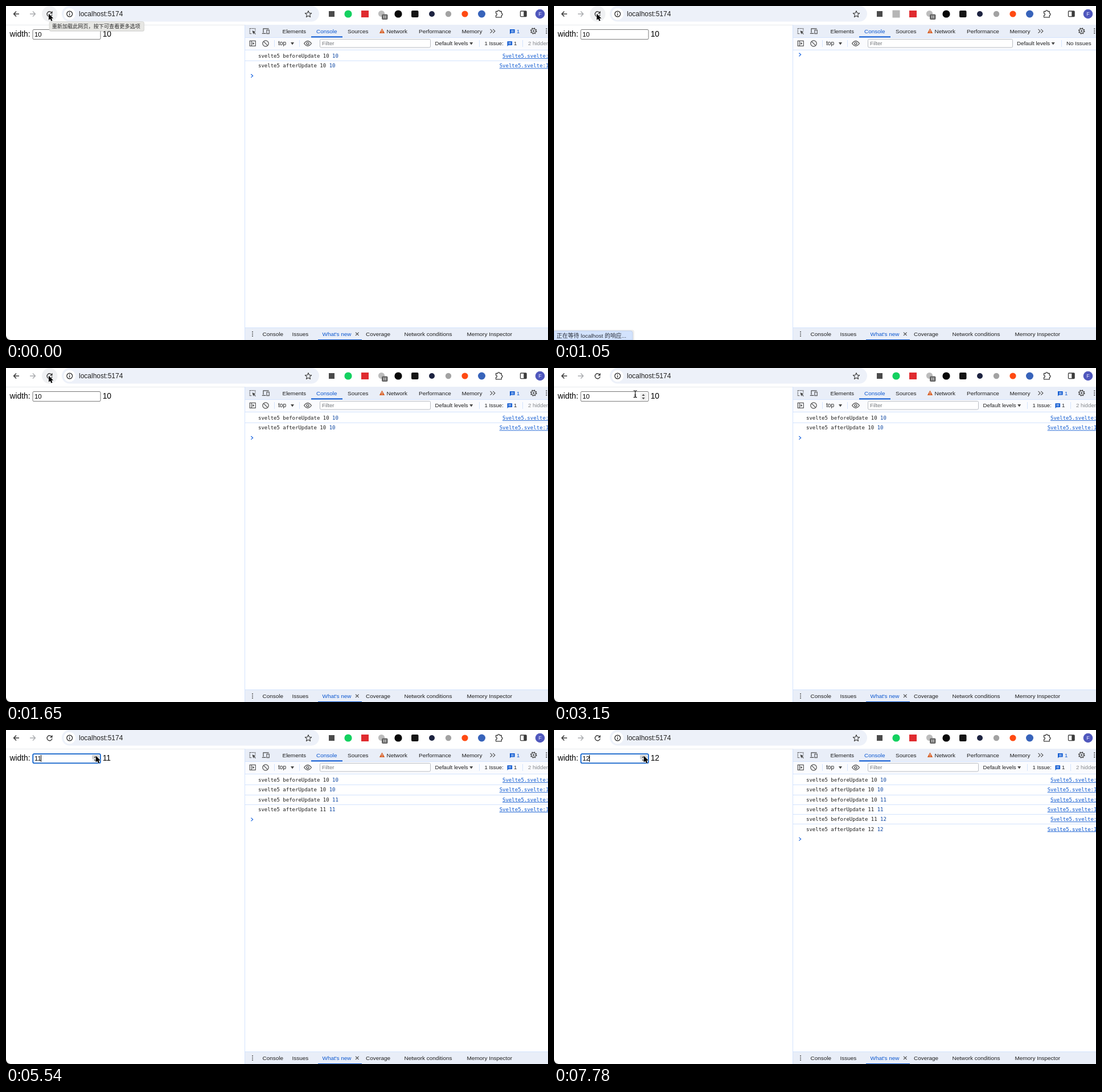
An HTML page that plays this animation: 952 px wide and 588 px high, repeating every 8 s.

```html
<!DOCTYPE html>
<html lang="zh">
<head>
<meta charset="utf-8">
<title>Svelte 5 update log</title>
<style>
html, body { margin: 0; width: 100%; height: 100%; overflow: hidden; background: #fff; }
svg { display: block; width: 952px; height: 588px; }
text { white-space: pre; font-family: "Liberation Sans", Arial, sans-serif; }
.mono { font-family: "DejaVu Sans Mono", Menlo, monospace; font-size: 9px; }
.cjk { font-family: "Liberation Sans", "Noto Sans CJK SC", "Noto Sans CJK", sans-serif; }
</style>
</head>
<body>
<svg id="stage" viewBox="0 0 952 588" xmlns="http://www.w3.org/2000/svg">
  <g id="fixed"></g>
  <g id="live"></g>
</svg>
<script>
const LOOP = 8000;
const BLUE = '#0b57d0', INK = '#1f1f1f', GREY = '#474747', BAR = '#e9eef8', RULE = '#d3e3fd';

const text = (x, y, s, size = 10, fill = INK, extra = '') =>
  `<text x="${x}" y="${y}" font-size="${size}" fill="${fill}" ${extra}>${s}</text>`;
const rect = (x, y, w, h, fill, extra = '') =>
  `<rect x="${x}" y="${y}" width="${w}" height="${h}" fill="${fill}" ${extra}/>`;
const disc = (x, y, r, fill, extra = '') =>
  `<circle cx="${x}" cy="${y}" r="${r}" fill="${fill}" ${extra}/>`;
const line = (d, stroke = GREY, w = 1.2, extra = '') =>
  `<path d="${d}" fill="none" stroke="${stroke}" stroke-width="${w}" ${extra}/>`;
const shape = (d, fill, extra = '') => `<path d="${d}" fill="${fill}" ${extra}/>`;
const dots = (x, y, gap, r) =>
  [-gap, 0, gap].map(d => disc(x, y + d, r, GREY)).join('');
const caretDown = (x, y) => shape(`M${x - 3} ${y - 2}h6l-3 4.4z`, GREY);
const issueIcon = (x, y) =>
  shape(`M${x} ${y}h8.6v6.6h-6.6l-2 2z`, BLUE) +
  line(`M${x + 2} ${y + 2.2}h4.8M${x + 2} ${y + 4.4}h4.8`, '#fff', 0.9);

function browserBar() {
  return rect(0, 0, 952, 33, '#fff') +
    rect(0, 33, 420, 1, '#e6e8ec') +
    line('M23 14H14M18 9.6L13.6 14L18 18.4', '#3c3c3c', 1.5) +
    line('M42 14H51M47 9.6L51.4 14L47 18.4', '#a9abae', 1.4) +
    rect(98, 0, 452, 27.5, '#edf1f9', 'rx="13.7"') +
    disc(111.7, 14, 10.3, '#fff') +
    disc(111.7, 14, 4.9, 'none', `stroke="${INK}" stroke-width="1.2"`) +
    line('M111.7 13.2V16.8M111.7 11V12.3', INK, 1.2) +
    text(128, 18, 'localhost:5174', 12) +
    shape('M531 8.6l1.6 3.7 4 .4-3 2.7.9 4-3.5-2.1-3.5 2.1.9-4-3-2.7 4-.4z', 'none',
      `stroke="${GREY}" stroke-width="1.2" stroke-linejoin="round"`) +
    // extension buttons as plain marks
    rect(567, 9, 10, 10, '#4b4b4b') +
    rect(624, 8, 13, 12, '#e02b2f') +
    disc(659.5, 13.5, 5.6, '#bcbcbc') +
    rect(660, 14.5, 10.5, 9.5, '#666', 'rx="2"') +
    line('M663.8 16.8V21.7M666.8 16.8V21.7', '#fff', 1) +
    disc(689, 14, 6.6, '#080808') +
    rect(712, 8, 12.5, 12, '#141414', 'rx="2"') +
    disc(748, 14, 5, '#1d2340') +
    disc(777, 14, 5.2, '#a2a2a2') +
    disc(806, 14, 5.6, '#ff4a12') +
    disc(835.5, 14, 6.5, '#3763ba') +
    line('M860.5 9.5h3.2a1.8 1.8 0 0 1 3.6 0h3v3.4a1.8 1.8 0 0 1 0 3.6v3.3h-9.8v-3.2a1.8 1.8 0 0 0 0-3.7z',
      '#3c3c3c', 1.3, 'stroke-linejoin="round"') +
    rect(903.5, 9, 10.5, 9.6, 'none', 'rx="1" stroke="#3c3c3c" stroke-width="1.3"') +
    rect(909.3, 9, 5, 9.6, '#3c3c3c') +
    disc(938, 14, 8.3, '#5058bd') +
    text(938, 17.2, 'F', 9, '#e5e7ff', 'text-anchor="middle"');
}

function devtoolsFrame() {
  const tabs = [[485.5, 'Elements'], [545, 'Console', BLUE], [600, 'Sources'],
    [668.5, 'Network'], [725, 'Performance'], [800.5, 'Memory']];
  const drawer = [[450.5, 'Console'], [502.5, 'Issues'], [555.5, "What's new", BLUE],
    [632, 'Coverage'], [699.5, 'Network conditions'], [809.5, 'Memory Inspector']];
  const row = (list, y) => list.map(([x, s, c]) => text(x, y, s, 9.95, c)).join('');
  return rect(419, 33, 1, 555, RULE) +
    rect(420, 33, 532, 22, BAR) + rect(420, 55, 532, 22, '#fafbfe') +
    rect(420, 55, 532, 1, RULE) + rect(420, 77, 532, 1, RULE) +
    // inspect and device buttons
    line('M437.8 43.2V39.6H428.2V48.6H431.6', GREY, 1.1, 'stroke-dasharray="1.6 1"') +
    shape('M432.5 43.2l6.3 2.4-2.6 1 2.6 2.6-.9.9-2.6-2.6-1 2.5z', GREY) +
    line('M452 47V39.8H461.6M449.8 48.3H456.5', GREY, 1.2) +
    rect(458, 42.3, 4.2, 6.4, 'none', `stroke="${GREY}" stroke-width="1.1"`) +
    row(tabs, 47.8) +
    rect(536, 53.4, 55, 2, BLUE) +
    shape('M660.5 39.6l4.7 8.4h-9.4z', '#d8622a') +
    line('M660.5 42.5V45.2M660.5 46V47', '#fff', 0.9) +
    line('M850.5 40.8l3.6 3.4-3.6 3.4M855.3 40.8l3.6 3.4-3.6 3.4', GREY, 1.1) +
    disc(926.7, 44, 3.9, 'none', `stroke="${GREY}" stroke-width="1.3"`) +
    disc(926.7, 44, 5.1, 'none', `stroke="${GREY}" stroke-width="1.5" stroke-dasharray="2 2"`) +
    disc(926.7, 44, 1.5, GREY) +
    dots(949.3, 44, 3.7, 1.1) +
    // console toolbar
    rect(428.2, 61.4, 10, 9, 'none', `stroke="${GREY}" stroke-width="1.1"`) +
    line('M431.3 61.4V70.4', GREY, 1.1) + shape('M433.2 63.6l3 2.3-3 2.3z', GREY) +
    disc(456, 66, 5.2, 'none', `stroke="${GREY}" stroke-width="1.2"`) +
    line('M452.4 62.4L459.6 69.6', GREY, 1.2) +
    rect(471, 60, 1, 12, RULE) + rect(515, 60, 1, 12, RULE) +
    text(478, 69.4, 'top', 10.2) + caretDown(503, 66) +
    line('M523.6 66Q530 57.4 536.4 66Q530 74.6 523.6 66z', GREY, 1.2) +
    disc(530, 66, 2, 'none', `stroke="${GREY}" stroke-width="1.2"`) +
    // drawer
    rect(420, 566, 532, 22, BAR) + rect(420, 566, 532, 1, RULE) +
    dots(433, 577.4, 3.6, 1) +
    row(drawer, 581) +
    rect(548, 587, 77, 1, BLUE) +
    line('M614 574.6l5.6 5.6M619.6 574.6l-5.6 5.6', GREY, 1.1);
}

function toolbarStatus(issues) {
  const right = issues ? 745.5 : 805.5, levels = issues ? 753.5 : 813;
  const out = rect(551.5, 58.5, right - 551.5, 14.5, '#fff', 'rx="2" stroke="#b9bcc2"') +
    text(555, 69.4, 'Filter', 9.7, '#75787c') +
    text(levels, 69.4, 'Default levels', 9.7) +
    caretDown(levels + 63.7, 66) +
    rect(issues ? 831 : 891, 60, 1, 12, RULE);
  if (!issues) return out + text(900, 69.4, 'No Issues', 9.8);
  return out +
    issueIcon(885, 41) + text(897, 47.9, '1', 9.5, BLUE) +
    text(840.5, 69.4, '1 Issue:', 9.5) +
    issueIcon(880.5, 62.3) + text(892, 69.4, '1', 9.5) +
    rect(907, 60, 1, 12, RULE) +
    text(917, 69.4, '2 hidden', 9.7, '#85888c');
}

function consoleRows(top) {
  const step = 17.27;
  let out = '', n = 0;
  const log = (hook, a, b, link, x) => {
    const y = 91.2 + step * n;
    if (n) out += rect(420, Math.round(y - 12.2), 532, 1, RULE);
    out += `<text class="mono" x="443" y="${y}" fill="${INK}">svelte5 ${hook} ${a} <tspan fill="#0842a0">${b}</tspan></text>`;
    out += `<text class="mono" x="${x}" y="${y}" fill="${BLUE}" text-decoration="underline">Svelte5.svelte:${link}</text>`;
    n++;
  };
  for (let v = 10; v <= top; v++) {
    log('beforeUpdate', Math.max(10, v - 1), v, 9, 872);
    log('afterUpdate', v, v, 13, 866.7);
  }
  const y = n ? 88.4 + step * n : 85.6;
  return out + line(`M430.4 ${y - 2.9}l3.2 2.9-3.2 2.9`, '#1a66e0', 1.2);
}

function field(s) {
  let out = s.focus
    ? rect(47.3, 42.1, 118.5, 16.2, '#fff', 'rx="2" stroke="#0c5fc9" stroke-width="1.8"')
    : rect(47, 41.5, 119, 17.2, '#fff', 'rx="2" stroke="#767676" stroke-width="1"');
  out += text(50, 54, s.value, 11.4, '#000');
  if (s.spinner) {
    out += rect(151.5, 44, 11.5, 13, '#efefef', 'rx="1"');
    if (s.spinner > 1) out += rect(151, 44, 12.5, 7, s.spinner > 2 ? '#b4b4b4' : '#d2d2d2', 'rx="1"');
    out += shape('M154.4 48.9h5.2l-2.6-3.2z', '#505050') + shape('M154.4 52h5.2l-2.6 3.2z', '#505050');
  }
  if (s.caret) out += rect(s.value === 11 ? 61 : 62, 44, 1, 12, '#000');
  return out + text(169.7, 54, s.value, 13.8, '#000');
}

function reload(hover) {
  return (hover ? disc(76.7, 14, 13.7, '#f0f1f3') : '') +
    line('M80.6 12.2A4.5 4.5 0 1 0 81 15.2', '#3c3c3c', 1.4) +
    shape('M81.6 8.8v4.7h-4.7z', '#3c3c3c');
}

function pointer([, x, y, beam]) {
  const body = beam
    ? ['#fff', '#000'].map((c, i) =>
        line('M-3 -6Q0 -6 0 -4V4Q0 6 -3 6M3 -6Q0 -6 0 -4V4Q0 6 3 6M-1.5 2H1.5', c, i ? 1.1 : 2.4)).join('')
    : shape('M0 0V11.3L2.6 9L4.4 13L6.5 12.1L4.8 8.2H8.2z', '#000',
        'stroke="#fff" stroke-width="1" stroke-linejoin="round" paint-order="stroke"');
  return `<g transform="translate(${x} ${y})">${body}</g>`;
}

const tooltip = () =>
  rect(76, 28, 167, 17, '#000', 'rx="3" opacity=".1"') +
  rect(76, 27.5, 166.5, 16.5, '#e7e7e4', 'rx="3" stroke="#cfcfcc" stroke-width=".7"') +
  text(80.7, 39.3, '重新加载此网页，按下可查看更多选项', 9.15, '#2c2c2c', 'class="cjk"');

const statusBubble = () =>
  shape('M0 570h137q4 0 4 4v14H0z', '#000', 'opacity=".07"') +
  shape('M0 572h134.5q3.5 0 3.5 3.5V588H0z', '#d3e3fd', 'stroke="#b4c6e6" stroke-width=".7"') +
  text(4.5, 584.2, '正在等待 localhost 的响应...', 9.95, '#2a2f38', 'class="cjk"');

// time, x, y, text beam
const path = [
  [0, 75, 13.5], [1950, 84, 19], [2100, 104, 27], [2250, 125, 33], [2400, 140, 37],
  [2550, 146, 39], [2850, 146, 44, 1], [3000, 144, 45, 1], [3150, 142.7, 45.7, 1],
  [3440, 149, 47, 1], [3590, 156, 46], [3740, 157.8, 45.5]
];
const caretFlips = [3300, 3740, 4190, 4940, 5540, 5990, 6430, 7030, 7480];

function stateAt(t) {
  const within = (a, b) => t >= a && t < b;
  const pressed = within(4490, 4790) || within(7480, 7780);
  return {
    value: t < 4490 ? 10 : t < 7480 ? 11 : 12,
    focus: t >= 3300,
    caret: caretFlips.filter(f => t >= f).length % 2,
    spinner: pressed ? 3 : t >= 3590 ? 2 : t >= 2850 ? 1 : 0,
    loading: within(900, 1350),
    bubble: within(900, 1500),
    tip: t < 750,
    hover: t < 2100,
    cursor: path.filter(p => t >= p[0]).pop()
  };
}

function render(s) {
  return reload(s.hover) +
    (s.loading ? rect(594.5, 7.5, 13, 13, '#b6b6b6') : disc(601, 14, 6.6, '#14d160')) +
    toolbarStatus(!s.loading) +
    consoleRows(s.loading ? 0 : s.value) +
    field(s) +
    (s.bubble ? statusBubble() : '') +
    (s.tip ? tooltip() : '') +
    pointer(s.cursor);
}

document.getElementById('fixed').innerHTML =
  rect(0, 0, 952, 588, '#fff') + browserBar() + devtoolsFrame() +
  text(6.5, 54, 'width:', 13.8, '#000') +
  shape('M0 580Q0.6 587.4 8 588H0z', '#000');

const live = document.getElementById('live');
const start = performance.now();
let shown = '';
function update(now) {
  const state = stateAt(Math.max(0, now - start) % LOOP);
  const key = JSON.stringify(state);
  if (key !== shown) {
    shown = key;
    live.innerHTML = render(state);
  }
  requestAnimationFrame(update);
}
update(start);
</script>
</body>
</html>
```
